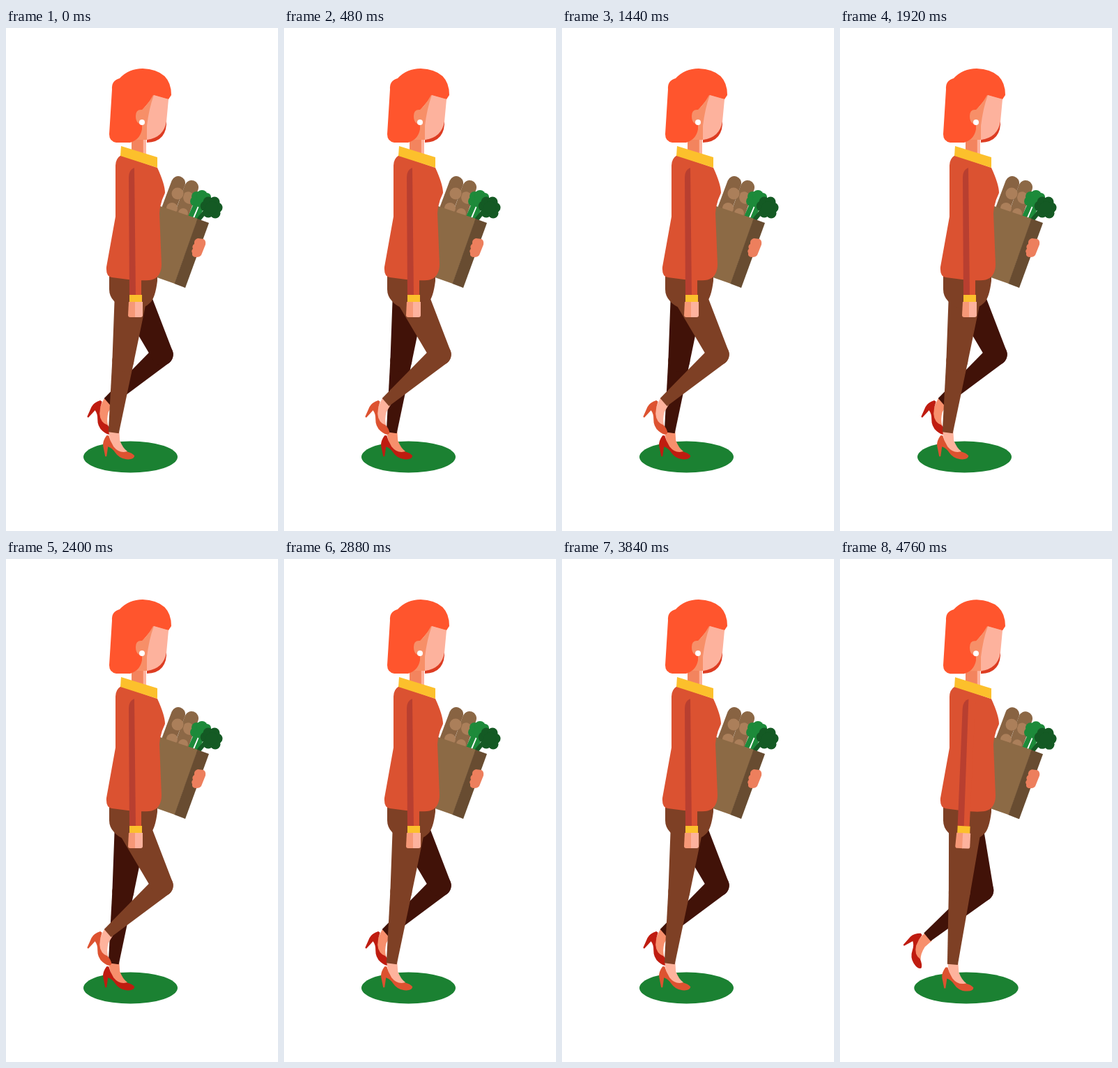
An HTML page for the animation above (4800 ms loop, 390 px wide and 720 px high).

```html
<!DOCTYPE html>
<html lang="en">
<head>
<meta charset="utf-8">
<title>Walking with groceries</title>
<style>
  html, body { margin: 0; height: 100%; overflow: hidden; background: #fff; }
  svg { display: block; width: 390px; height: 720px; }
</style>
</head>
<body>
<svg viewBox="0 0 390 720">
  <defs>
    <g id="leg">
      <g class="shin">
        <g class="foot">
          <path fill="var(--skin)" d="M-7-3H8L9 11Q13 22 20 27Q10 32 2 25Q-6 14-7-3z"/>
          <path fill="var(--shoe)" d="M-10 4Q-16 12-15 19L-12 34H-10L-8 20Q-2 22 2 28Q8 37 18 38Q30 39 30 33Q27 29 19 27Q8 30 0 20Q-5 12-7 4z"/>
        </g>
        <path fill="var(--pants)" d="M-15.5 0A15.5 15.5 0 0 1 15.5 0L7.5 104H-7.5z"/>
      </g>
      <path fill="var(--pants)" d="M-25 0A24 24 0 0 1 23 0L15.5 101A15.5 15.5 0 0 1-15.5 101z"/>
    </g>
  </defs>

  <ellipse id="shadow" cy="614" ry="22.5" fill="#1b8132"/>
  <g id="body">
    <g id="farLeg" style="--pants:#411208;--skin:#f78f6c;--shoe:#bf1c10"></g>
    <g id="nearLeg" style="--pants:#7e4025;--skin:#feb39d;--shoe:#dd5230"></g>
    <path fill="#7e4025" d="M148 352H217V362Q214 386 207 393Q199 401 185 404Q164 402 155 391Q148 384 148 374z"/>

    <g id="groceries">
      <g stroke-width="20" stroke-linecap="round">
        <path stroke="#8c6846" d="M266 228L250 272"/>
        <path stroke="#886342" d="M247 222L229 270"/>
      </g>
      <g fill="#ab7f5a">
        <circle cx="246" cy="237" r="8.5"/><circle cx="238" cy="258" r="8"/>
        <path d="M256 236Q263 231 270 240Q271 250 263 252Q254 250 254 242z"/>
        <circle cx="254" cy="265" r="7"/>
      </g>
      <path stroke="#1d8a3a" stroke-width="7" d="M276 244L263 274M282 252L272 276"/>
      <g fill="#1d8a3a">
        <circle cx="271" cy="248" r="7"/><circle cx="273" cy="241" r="7"/><circle cx="281" cy="240" r="8"/>
        <circle cx="288" cy="242" r="6"/><circle cx="281" cy="249" r="9"/>
      </g>
      <path stroke="#145a24" stroke-width="6" d="M288 260L273 278"/>
      <g fill="#145a24">
        <circle cx="286" cy="255" r="7.5"/><circle cx="290" cy="249" r="7.5"/><circle cx="299" cy="249" r="7.5"/>
        <circle cx="303" cy="257" r="7.5"/><circle cx="300" cy="265" r="7.5"/><circle cx="290" cy="264" r="7.5"/>
        <circle cx="295" cy="257" r="9"/>
      </g>
      <path fill="#8c6a45" d="M212 252L275 273L242 366L205 353z"/>
      <path fill="#684c31" d="M274.5 273L291 279L257 372L241.5 366z"/>
      <path fill="#ed7f5d" d="M275 301L283 302Q287 304 286 310L280 325Q278 328 273 328Q266 328 267 322Q265 319 268 316Q266 312 270 309Q269 303 275 301z"/>
    </g>

    <path fill="#f78f68" d="M180 125H201V190H180z"/>
    <path fill="#fdb29d" d="M197 150H201V185H197z"/>
    <path fill="#f3845e" d="M180 160H196V180L180 176z"/>
    <path fill="#db5231" d="M165 182Q157 187 157 197V270L144 342Q143 356 152 357L175 360Q194 362 205 361C218 360 223 350 223 338L220 265Q221 250 228 236Q228 224 217 200z"/>
    <path fill="#fcc02c" d="M165 169L217 185V200L164 183z"/>

    <path fill="#dd3c22" d="M202 158L230 130Q232 163 202 164z"/>
    <path fill="#ff552d" d="M152 88Q151 75 163 72Q176 58 196 58Q237 60 237 96L233 102L211 99L195 118V145Q192 160 178 164H158Q148 162 148 152z"/>
    <path fill="#f78f68" d="M211 96L233 102L204 160H196V138Q186 138 186 126Q186 116 195 117Q203 110 211 96z"/>
    <path fill="#fdb29d" d="M212 96L233 102L230 134Q226 157 202 160V140Q205 115 212 96z"/>
    <circle cx="195" cy="135" r="4" fill="#fff"/>

    <g id="arm">
      <path fill="#db5231" d="M184 205H194V383H180z"/>
      <path fill="#b83f30" d="M184 200Q176 203 176 214L177 383H186z"/>
      <path fill="#fcc02c" d="M177 382H195V393H177z"/>
      <path fill="#f69877" d="M176 392H186V414H178Q175 414 175 411z"/>
      <path fill="#fdb29d" d="M185 392H196V411Q196 414 193 414H185z"/>
    </g>
  </g>
</svg>
<script>
const FRAME = 40, CYCLE = 24;
const HIP = [181, 376], THIGH = 101, SHIN = 104;
// frame in the cycle, thigh angle, shin angle, foot angle
const GAIT = [
  [0, -7.5, -7.5, 0], [3, -9.7, -9.7, 0], [5.5, -13, -20, 18], [8, -13, -48, 45],
  [11, 13.6, -50, 53], [12, 25.3, -49, 35], [15, 34.8, -1, -4], [18, 18, 14, -4],
  [20, 13, 2, 0], [23, -5.5, -5.5, 0]
];
const $ = id => document.getElementById(id);

function makeLeg(holder) {
  holder.append(...[...$('leg').children].map(part => part.cloneNode(true)));
  return { holder, shin: holder.querySelector('.shin'), foot: holder.querySelector('.foot') };
}

function key(i) {
  const n = GAIT.length, turn = Math.floor(i / n), [at, ...pose] = GAIT[i - turn * n];
  return [at + turn * CYCLE, ...pose];
}

// Smooth periodic curve through the gait keys
function gait(frame) {
  const x = frame % CYCLE;
  const i = GAIT.findLastIndex(k => k[0] <= x);
  const [a, b, c, d] = [i - 1, i, i + 1, i + 2].map(key);
  const span = c[0] - b[0], u = (x - b[0]) / span, v = 1 - u;
  return [1, 2, 3].map(j => {
    const slopeB = (c[j] - a[j]) / (c[0] - a[0]), slopeC = (d[j] - b[j]) / (d[0] - b[0]);
    return b[j] * (1 + 2 * u) * v * v + c[j] * (3 - 2 * u) * u * u
      + span * u * v * (slopeB * v - slopeC * u);
  });
}

function place(node, x, y, angle) {
  node.setAttribute('transform', `translate(${x} ${y}) rotate(${angle})`);
}

function poseLeg(leg, frame) {
  const [thigh, shin, foot] = gait(frame);
  place(leg.holder, ...HIP, -thigh);
  place(leg.shin, 0, THIGH, thigh - shin);
  place(leg.foot, 0, SHIN, shin + foot);
}

const near = makeLeg($('nearLeg')), far = makeLeg($('farLeg'));

function draw(ms) {
  const frame = Math.floor(ms / FRAME) % CYCLE;
  const turn = 2 * Math.PI * frame / CYCLE;
  const stride = Math.sin(turn) ** 2;

  place($('body'), 0, 5 * stride, 0);
  poseLeg(near, frame);
  poseLeg(far, frame + CYCLE / 2);
  $('arm').setAttribute('transform', `rotate(${-10.6 * Math.sin(turn)} 183 208)`);

  const spread = stride ** 0.72, left = 111 - 33 * spread, right = 246 + 68 * spread;
  $('shadow').setAttribute('cx', (left + right) / 2);
  $('shadow').setAttribute('rx', (right - left) / 2);
}

let start;
function tick(now) {
  start ??= now;
  draw(now - start);
  requestAnimationFrame(tick);
}
draw(0);
requestAnimationFrame(tick);
</script>
</body>
</html>
```
